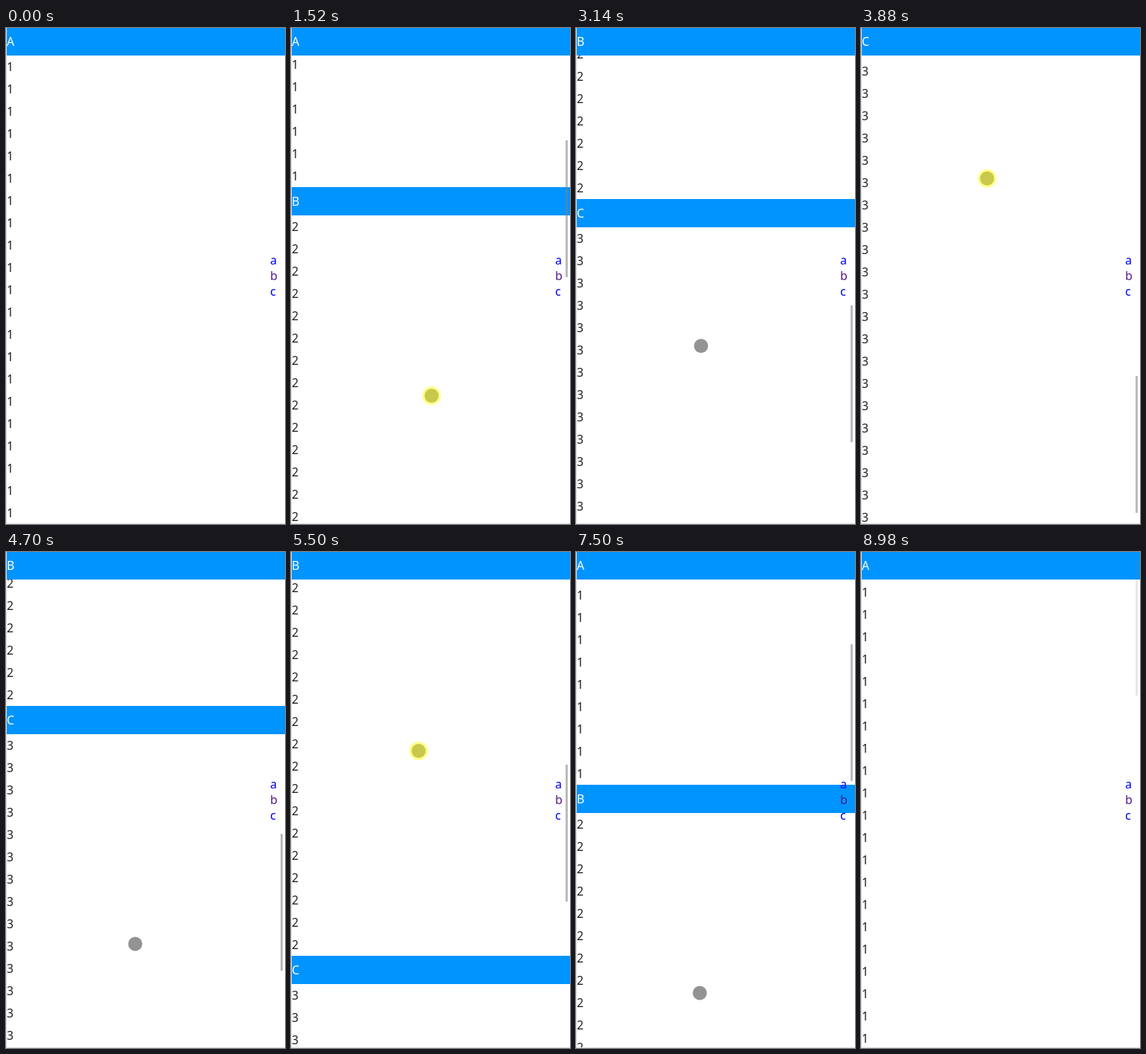
Write an HTML page that moves like this. It is 376 px wide and 667 px high and loops after 9060 ms.

```html
<!DOCTYPE html>
<html lang="en">
<head>
<meta charset="utf-8">
<title>Sticky section list</title>
<style>
  html, body { margin: 0; width: 100%; height: 100%; overflow: hidden; background: #fff; }
  body { position: relative; font: 16px "Noto Sans", "Open Sans", sans-serif; color: #222; }
  #list { position: absolute; left: 1px; top: -1px; width: 375px; height: 668px; overflow: hidden; }
  h2 {
    position: sticky; top: 0; margin: 0; height: 38px;
    font: 500 16px/38px "Noto Sans", "Open Sans", sans-serif;
    background: #0094ff; color: #fff;
  }
  p { margin: 0; height: 30px; line-height: 30px; }
  #frame {
    position: absolute; left: 0; top: 0; width: 375px; height: 666px;
    border: solid #ddd; border-width: 0 0 1px 1px;
  }
  #index { position: absolute; left: 356px; top: 302px; line-height: 21px; color: #00e; }
  #index span { display: block; }
  #index .visited { color: #551a8b; }
  #thumb { position: absolute; left: 370px; top: 0; width: 3px; height: 184px; background: rgba(128, 128, 128, .54); }
  #cursor {
    position: absolute; left: -9.5px; top: -9.5px; width: 19px; height: 19px;
    border-radius: 50%; background: #939393;
  }
  #cursor.hover { background: #c8c84c; box-shadow: 0 0 0 3px #ffff8c; }
</style>
</head>
<body>
<div id="list"></div>
<div id="frame"></div>
<div id="index"><span>a</span><span class="visited">b</span><span>c</span></div>
<div id="thumb"></div>
<div id="cursor"></div>
<script>
const LOOP = 9060;
const COAST_END = 8650;
const byId = id => document.getElementById(id);
const list = byId('list'), thumb = byId('thumb'), cursor = byId('cursor');

const addSection = (title, digit, count) => {
  const section = document.createElement('section');
  section.innerHTML = `<h2>${title}</h2>` + `<p>${digit}</p>`.repeat(count);
  list.append(section);
};
addSection('A', 1, 24);
addSection('B', 2, 26);
addSection('C', 3, 27);

// Each drag: press and release time, path of the finger, scroll offset after coasting.
const drags = [
  { from: 420,  to: 900,  x0: 180, y0: 560, x1: 186, y1: 180, rest: 543 },
  { from: 1560, to: 2110, x0: 189, y0: 494, x1: 176, y1: 120, rest: 1130 },
  { from: 2900, to: 3400, x0: 168, y0: 642, x1: 168, y1: 196, rest: 1690 },
  { from: 4200, to: 4750, x0: 170, y0: 204, x1: 174, y1: 558, rest: 986 },
  { from: 6080, to: 6600, x0: 170, y0: 100, x1: 171, y1: 334, rest: 700 },
  { from: 7000, to: 7600, x0: 168, y0: 337, x1: 166, y1: 643, rest: 28 }
];

const clamp = v => Math.min(1, Math.max(0, v));
const mix = (a, b, p) => a + (b - a) * p;
const smooth = p => p * p * (3 - 2 * p);

function scrollAt(t) {
  let start = 0;
  for (let i = 0; i < drags.length; i++) {
    const d = drags[i], end = drags[i + 1]?.from ?? COAST_END;
    if (t < d.from) return start;
    if (t < d.to) return start + (d.y0 - d.y1) * (t - d.from) / (d.to - d.from);
    if (t < end) {
      const released = start + d.y0 - d.y1;
      const speed = (d.y0 - d.y1) / (d.to - d.from);
      // The exponent keeps the release speed continuous.
      const power = speed * (end - d.to) / (d.rest - released);
      return mix(d.rest, released, (1 - (t - d.to) / (end - d.to)) ** power);
    }
    start = d.rest;
  }
  return start;
}

function cursorAt(t) {
  let last = { to: 60, x1: 180, y1: 690 };
  for (const d of drags) {
    if (t < d.from) {
      const p = smooth(clamp((t - last.to) / (d.from - 60 - last.to)));
      return { x: mix(last.x1, d.x0, p), y: mix(last.y1, d.y0, p), pressed: false };
    }
    if (t < d.to) {
      const p = (t - d.from) / (d.to - d.from);
      return { x: mix(d.x0, d.x1, p), y: mix(d.y0, d.y1, p), pressed: true };
    }
    last = d;
  }
  return { x: last.x1, y: mix(last.y1, 700, clamp((t - last.to) / 250)), pressed: false };
}

function draw(now) {
  const t = now % LOOP;
  const offset = Math.round(scrollAt(t));
  const { x, y, pressed } = cursorAt(t);
  list.scrollTop = offset;
  thumb.style.transform = `translateY(${Math.round(1 + offset * 0.2765)}px)`;
  thumb.style.opacity = t < drags[0].from ? 0 : 1 - clamp((t - 8800) / 280);
  cursor.style.transform = `translate(${x}px, ${y}px)`;
  cursor.className = pressed ? '' : 'hover';
}

const origin = performance.now();
function tick() {
  draw(performance.now() - origin);
  requestAnimationFrame(tick);
}
tick();
</script>
</body>
</html>
```
